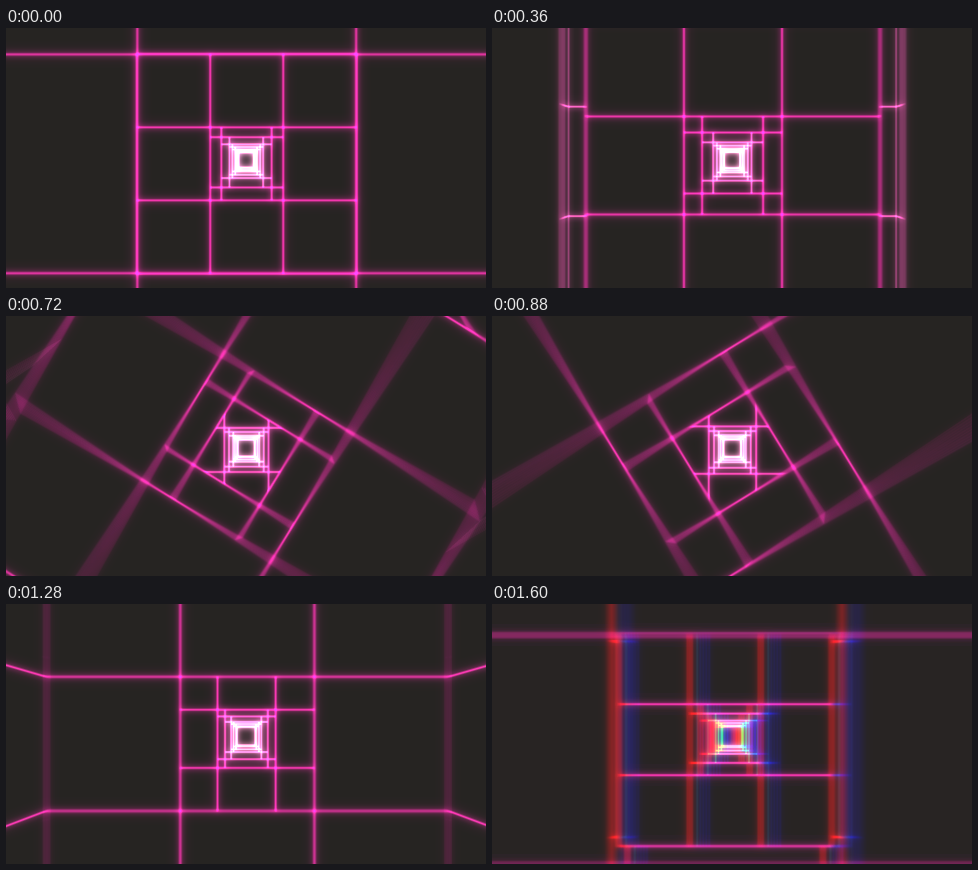
Animation, 480 px wide and 260 px high, one loop 1.64 s. Source, as an HTML page with a canvas:

```html
<!DOCTYPE html>
<html lang="en">
<head>
<meta charset="utf-8">
<title>Neon grid tunnel</title>
<style>
html, body { margin: 0; width: 100%; height: 100%; overflow: hidden; background: #262422; }
canvas { display: block; width: 480px; height: 260px; }
</style>
</head>
<body>
<canvas id="stage" width="480" height="260"></canvas>
<script>
const W = 480, H = 260, PAD = 16, LOOP = 1640, STEP = 40;
const SPEED = 9.72e-6;          // depth units per ms
const PERIOD = SPEED * LOOP;    // distance between rings
const THICK = 0.0062;           // depth of one ring
const NEAR = 0.0008;
const RINGS = 4, SAMPLES = 10, SHUTTER = 30;
const LINES = [-1.5, -0.5, 0.5, 1.5];
const STROKES = [[3, 0.35], [1.4, 0.5]];
const BLOOM = [[2.5, 0.9], [6, 0.65]];

const stage = document.getElementById('stage').getContext('2d');
const g = makeLayer(), blurred = makeLayer(), glow = makeLayer(), tint = makeLayer();

// Off-screen layers carry a margin so blur and shifts have no hard edge.
function makeLayer() {
  const c = document.createElement('canvas');
  c.width = W + 2 * PAD;
  c.height = H + 2 * PAD;
  const ctx = c.getContext('2d');
  ctx.translate(PAD, PAD);
  return ctx;
}

function fillAll(ctx, color) {
  ctx.fillStyle = color;
  ctx.fillRect(-PAD, -PAD, W + 2 * PAD, H + 2 * PAD);
}

const put = (ctx, from, dx = 0) => ctx.drawImage(from.canvas, dx - PAD, -PAD);
const clamp = u => Math.max(0, Math.min(1, u));
const ramp = (t, a, b) => clamp((t - a) / (b - a));
const smooth = u => (1 - Math.cos(Math.PI * u)) / 2;

// Returns a function that projects lattice points of one plane.
function plane(z, size, angle) {
  const s = 1 / z, k = s * size, c = Math.cos(angle), n = Math.sin(angle);
  const cx = 240 + 0.01 * s, cy = 131 + 0.066 * s;
  return (x, y) => [cx + k * (x * c - y * n), cy + k * (x * n + y * c)];
}

function addSquare(path, at, r) {
  [[-r, -r], [r, -r], [r, r], [-r, r]].forEach(([x, y], i) => {
    path[i ? 'lineTo' : 'moveTo'](...at(x, y));
  });
  path.closePath();
}

function addLine(path, a, b) {
  path.moveTo(...a);
  path.lineTo(...b);
}

// Lines get thinner and hotter with depth.
function neon(path, z) {
  const scale = Math.min(1, 0.5 + 0.009 / z);
  const heat = ramp(z, 0.018, 0.04);
  const rgb = [190 + 50 * heat, 20 + 110 * heat, 130 + 60 * heat];
  g.globalCompositeOperation = 'lighter';
  for (const [width, alpha] of STROKES) {
    g.lineWidth = Math.max(1, width * scale);
    g.strokeStyle = `rgba(${rgb},${alpha})`;
    g.stroke(path);
  }
  g.globalCompositeOperation = 'source-over';
}

function fillFrame(outer, ro, inner, ri) {
  const path = new Path2D();
  addSquare(path, outer, ro);
  addSquare(path, inner, ri);
  g.fillStyle = '#000';
  g.fill(path, 'evenodd');
}

// 3 x 3 grid with an open centre cell.
function drawFace(z, size, angle) {
  if (z < NEAR) return;
  const at = plane(z, size, angle);
  fillFrame(at, 1.5, at, 0.5);
  const rows = new Path2D(), cols = new Path2D();
  for (const v of LINES) {
    addLine(rows, at(-1.5, v), at(1.5, v));
    addLine(cols, at(v, -1.5), at(v, 1.5));
  }
  neon(rows, z);
  neon(cols, z);
}

// Side walls joining a front plane to the back plane behind it.
function drawSides(z, back, size, angle) {
  const front = Math.max(z, NEAR);
  const a = plane(back, size, angle), b = plane(front, size, angle);
  fillFrame(b, 1.5, a, 1.5);
  const edges = new Path2D();
  for (const x of LINES) for (const y of LINES) {
    if (Math.abs(x) > 1 || Math.abs(y) > 1) addLine(edges, a(x, y), b(x, y));
  }
  neon(edges, back);
}

function drawRing(z, angle) {
  drawFace(z + THICK, 1, angle);
  drawSides(z, z + THICK, 1, angle);
  drawFace(z, 1, angle);
}

// Outer wall: a large grid that sinks into the opening of a larger one.
function drawWall(z, depth, angle) {
  drawFace(z, 3, angle);
  if (depth <= 0) return;
  drawSides(z - depth, z, 3, angle);
  drawFace(z - depth, 9, angle);
}

function drawScene(t) {
  fillAll(g, '#000');
  const z = 0.0137 - SPEED * t;
  const turn = Math.PI / 2 * smooth(ramp(t, 387, 1213));
  for (let i = RINGS - 1; i > 1; i--) drawRing(z + i * PERIOD, 0);
  const wall = z + 0.0172 * smooth(ramp(t, 0, 345));
  drawWall(wall, THICK * smooth(ramp(t, 290, 560)), -turn);
  drawRing(z + PERIOD, 0);
  drawRing(z, turn);
}

function drawGlow() {
  glow.globalCompositeOperation = 'source-over';
  glow.globalAlpha = 1;
  fillAll(glow, '#262422');
  glow.globalCompositeOperation = 'lighter';
  put(glow, blurred);
  for (const [radius, gain] of BLOOM) {
    glow.filter = `blur(${radius}px)`;
    glow.globalAlpha = gain;
    put(glow, blurred);
  }
  glow.filter = 'none';
}

// Adds one colour channel, spread over a range of horizontal offsets.
function addChannel(color, from, to, count) {
  tint.globalCompositeOperation = 'copy';
  put(tint, glow);
  tint.globalCompositeOperation = 'multiply';
  fillAll(tint, color);
  stage.globalAlpha = 1 / count;
  for (let i = 0; i < count; i++) {
    put(stage, tint, from + (to - from) * i / Math.max(1, count - 1));
  }
}

function render(t) {
  for (let i = 0; i < SAMPLES; i++) {
    drawScene(t + SHUTTER * ((i + 0.5) / SAMPLES - 0.5));
    blurred.globalAlpha = 1 / (i + 1);
    put(blurred, g);
  }
  drawGlow();
  const split = ramp(t, 1520, 1600) ** 2;
  stage.globalCompositeOperation = 'source-over';
  stage.globalAlpha = 1;
  if (!split) {
    put(stage, glow);
    return;
  }
  fillAll(stage, '#000');
  stage.globalCompositeOperation = 'lighter';
  addChannel('#f00', -10 * split, -5 * split, 4);
  addChannel('#0f0', 0, 0, 1);
  addChannel('#00f', 0, 12 * split, 5);
}

let start = null, shown = -1;
function tick(now) {
  if (start === null) start = now;
  const t = Math.floor(((now - start) % LOOP) / STEP) * STEP;
  if (t !== shown) {
    shown = t;
    render(t);
  }
  requestAnimationFrame(tick);
}
requestAnimationFrame(tick);
</script>
</body>
</html>
```
